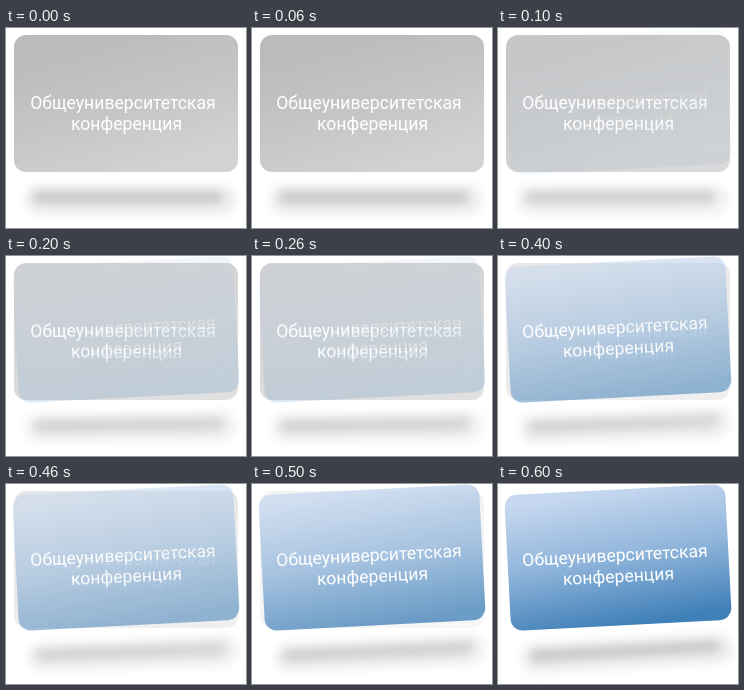
Recreate the animation shown at these times as an HTML page with a canvas. Size 240 by 200 pixels, loop 0.7 s.

```html
<!DOCTYPE html>
<html lang="ru">
<head>
<meta charset="utf-8">
<title>Общеуниверситетская конференция</title>
<style>
html, body { margin: 0; width: 100%; height: 100%; overflow: hidden; background: #fff; }
canvas { display: block; width: 240px; height: 200px; }
</style>
</head>
<body>
<canvas id="stage" width="240" height="200"></canvas>
<script>
const W = 240, H = 200;
const STEP = 100, STEPS = 7;
const ctx = document.getElementById('stage').getContext('2d');

function roundRect(c, x, y, w, h, r) {
  c.beginPath();
  c.moveTo(x + r, y);
  c.arcTo(x + w, y, x + w, y + h, r);
  c.arcTo(x + w, y + h, x, y + h, r);
  c.arcTo(x, y + h, x, y, r);
  c.arcTo(x, y, x + w, y, r);
  c.closePath();
}

// Soft bar centred on x, y
function softBar(c, x, y, w, h, blur, alpha) {
  c.save();
  c.filter = `blur(${blur}px)`;
  roundRect(c, x - w / 2, y - h / 2, w, h, h / 2);
  c.fillStyle = `rgba(0,0,0,${alpha})`;
  c.fill();
  c.restore();
}

// Renders a card with its text and shadow as one layer, so it can fade as a whole
function makeCard({ x, y, w, h, tilt, slant, colors, lines }) {
  const layer = document.createElement('canvas');
  layer.width = W;
  layer.height = H;
  const c = layer.getContext('2d');
  c.translate(x, y);
  c.rotate(tilt * Math.PI / 180);

  softBar(c, 4, 96, 212, 30, 4, 0.07);
  softBar(c, 2, 94, 190, 12, 4, 0.15);

  const fill = c.createLinearGradient(-slant, -h / 2, slant, h / 2);
  colors.forEach((color, i) => fill.addColorStop(i / (colors.length - 1), color));
  roundRect(c, -w / 2, -h / 2, w, h, 12);
  c.fillStyle = fill;
  c.fill();

  c.fillStyle = '#fff';
  c.font = '17.6px Roboto, "Noto Sans", sans-serif';
  c.textAlign = 'center';
  for (const [text, tx, ty] of lines) c.fillText(text, tx, ty);
  return layer;
}

const TOP = 'Общеуниверситетская', BOTTOM = 'конференция';

const gray = makeCard({
  x: 120, y: 75.5, w: 224, h: 137, tilt: 0, slant: 20,
  colors: ['#bbbbbb', '#c5c5c5', '#d2d2d2'],
  lines: [[TOP, -3, 5], [BOTTOM, 0.5, 26.5]]
});

const blue = makeCard({
  x: 120, y: 73.5, w: 221, h: 136, tilt: -3, slant: 8,
  colors: ['#c6d8f0', '#8fb4da', '#4080b8'],
  lines: [[TOP, -3, 3.7], [BOTTOM, -0.5, 24.7]]
});

function show(layer, alpha) {
  ctx.globalAlpha = alpha;
  ctx.drawImage(layer, 0, 0);
  ctx.globalAlpha = 1;
}

function draw(t) {
  ctx.fillStyle = '#fff';
  ctx.fillRect(0, 0, W, H);
  show(gray, 1 - t);
  show(blue, t ** 1.5);
}

const start = performance.now();
function tick(now) {
  const step = Math.floor(Math.max(0, now - start) / STEP) % STEPS;
  draw(step / (STEPS - 1));
  requestAnimationFrame(tick);
}
draw(0);
requestAnimationFrame(tick);
</script>
</body>
</html>
```
